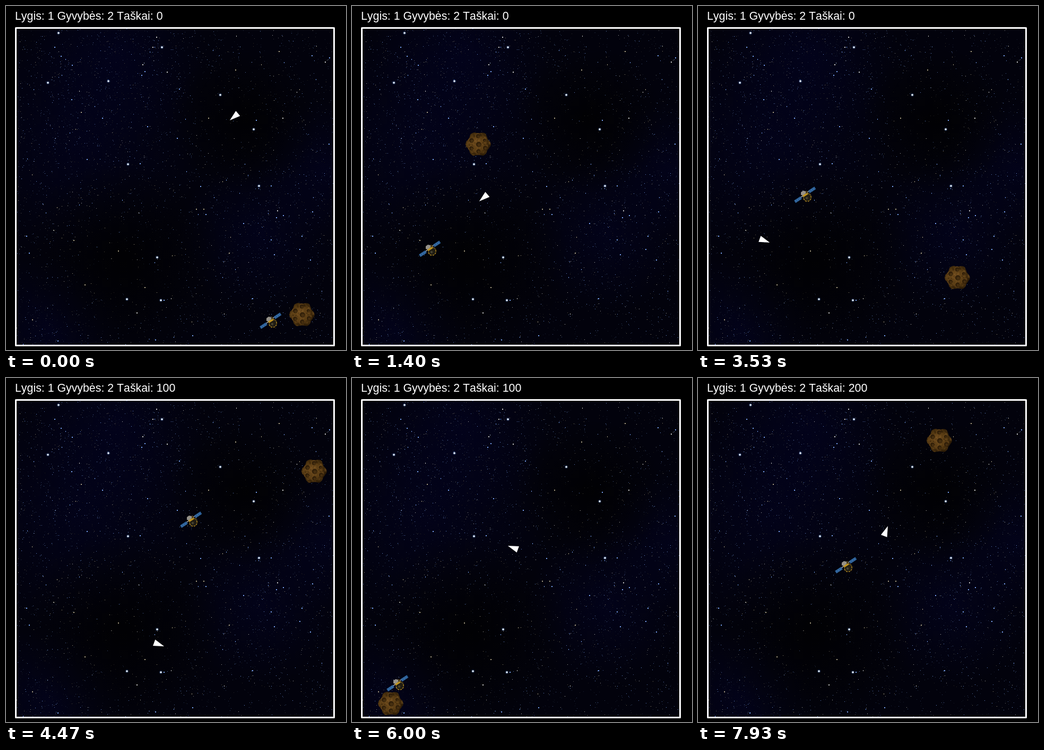
Animation of 641 by 650 pixels, one loop 8 s. Source, as an HTML page with a canvas:

```html
<!DOCTYPE html>
<html lang="lt">
<head>
<meta charset="utf-8">
<title>Asteroidai</title>
<style>
html, body { margin: 0; width: 100%; height: 100%; overflow: hidden; background: #000; }
canvas { display: block; }
</style>
</head>
<body>
<canvas id="stage" width="641" height="650"></canvas>
<script>
const W = 641, H = 650, LOOP = 8000, STEP = 200 / 3, TAU = Math.PI * 2;
const ctx = document.getElementById('stage').getContext('2d');

// Turning points [time, x, y]; the bodies fly straight between them
const asteroidTurns = [
  [0, 558, 582.5], [140, 602, 625], [1400, 237.5, 260.5], [2175, 28, 52],
  [3533, 488.5, 512.5], [3800, 607, 625], [4467, 580.5, 176], [4770, 555, 54],
  [5905, 28, 580], [6000, 72.5, 615], [7230, 608, 100], [7230, 603, 478],
  [7933, 454.5, 117.5]
];
const probeTurns = [
  [0, 499, 595], [110, 604, 631], [900, 42, 54], [1400, 147, 458.5],
  [1650, 220, 631], [2200, 607, 500], [2400, 534, 412], [2800, 320, 55],
  [3310, 41, 480], [3533, 202, 357], [4050, 470, 53], [4467, 349, 268],
  [4920, 32, 430], [5220, 190, 631], [5640, 28, 250], [6000, 86, 577],
  [6740, 606, 350], [7130, 400, 53], [7570, 51, 265], [7933, 279, 354]
];
// The ship curves through [time, x, y, heading in degrees]
const SHIP_SPEED = 0.18;
const shipTurns = [
  [0, 432, 207.6, 140], [1400, 250, 360.6, 140], [2400, 126, 464.6, 140],
  [2870, 62, 495, 215], [3533, 122.8, 442.4, 20], [4467, 285.8, 502.6, 20],
  [5200, 366, 450, -90], [6000, 306.2, 321.5, -160], [6800, 200, 350, 90],
  [7933, 353.2, 292, -69]
];

function segment(turns, t) {
  let i = 0;
  while (i < turns.length - 2 && t >= turns[i + 1][0]) i++;
  const a = turns[i], b = turns[i + 1], span = b[0] - a[0];
  return { a, b, span, k: Math.min(1, (t - a[0]) / span) };
}

function straight(turns, t) {
  const { a, b, k } = segment(turns, t);
  return [1, 2].map(j => a[j] + (b[j] - a[j]) * k);
}

// Hermite curve; its slope gives the heading
function curve(turns, t) {
  const { a, b, span, k } = segment(turns, t);
  const axis = (j, trig) => {
    const p = a[j], d = b[j] - p;
    const u = trig(a[3] * TAU / 360) * SHIP_SPEED * span;
    const v = trig(b[3] * TAU / 360) * SHIP_SPEED * span;
    const q = 3 * d - 2 * u - v, c = u + v - 2 * d;
    return [p + k * (u + k * (q + k * c)), u + k * (2 * q + 3 * k * c)];
  };
  const [x, dx] = axis(1, Math.cos), [y, dy] = axis(2, Math.sin);
  return [x, y, Math.atan2(dy, dx)];
}

function random(seed) {
  return () => {
    seed = (seed * 1664525 + 1013904223) >>> 0;
    return seed / 4294967296;
  };
}

function poly(c, points, fill) {
  c.beginPath();
  points.forEach(([x, y]) => c.lineTo(x, y));
  c.closePath();
  c.fillStyle = fill;
  c.fill();
}

function dot(c, x, y, r, fill) {
  c.beginPath();
  c.arc(x, y, r, 0, TAU);
  c.fillStyle = fill;
  c.fill();
}

function layer(w, h, paint) {
  const el = document.createElement('canvas');
  el.width = w;
  el.height = h;
  paint(el.getContext('2d'));
  return el;
}

function glow(c, x, y, r, rgb, alpha) {
  const g = c.createRadialGradient(x, y, 0, x, y, r);
  g.addColorStop(0, `rgba(${rgb},${alpha})`);
  g.addColorStop(0.5, `rgba(${rgb},${alpha * 0.5})`);
  g.addColorStop(1, `rgba(${rgb},0)`);
  c.fillStyle = g;
  c.fillRect(x - r, y - r, 2 * r, 2 * r);
}

// Regions: x, y, radius
const clouds = [[140, 250, 230], [210, 90, 170], [600, 310, 130], [480, 430, 150], [80, 610, 140]];
const voids = [[450, 215, 140], [220, 480, 190]];
const brightest = [
  [99, 51], [294, 78], [193, 142], [79, 145], [404, 168], [467, 233],
  [230, 299], [477, 340], [285, 475], [228, 554], [292, 556]
];

const sky = layer(W, H, c => {
  const rnd = random(77);
  c.fillStyle = '#000';
  c.fillRect(0, 0, W, H);
  c.save();
  c.beginPath();
  c.rect(19, 42, 600, 600);
  c.clip();
  c.fillStyle = '#02020c';
  c.fillRect(19, 42, 600, 600);
  clouds.forEach(([x, y, r]) => glow(c, x, y, r, '3,3,38', 0.5));
  voids.forEach(([x, y, r]) => glow(c, x, y, r, '1,1,3', 0.95));
  const density = (list, x, y) => list.reduce((sum, [cx, cy, r]) =>
    sum + Math.max(0, 1 - Math.hypot(x - cx, y - cy) / r), 0);
  for (let i = 0; i < 6500; i++) {
    const x = 20 + Math.floor(rnd() * 598), y = 43 + Math.floor(rnd() * 598);
    const blue = density(clouds, x, y), dark = density(voids, x, y);
    const keep = rnd(), level = rnd(), tint = rnd();
    if (keep > 0.65 + blue * 0.4 - dark * 0.5) continue;
    const light = 32 + 175 * level ** 3;
    const rgb = tint < 0.12 + dark * 0.4 ? [0.85, 0.8, 0.66]
      : tint > 0.85 ? [1, 1, 1] : [0.6, 0.8, 1.2];
    c.fillStyle = `rgb(${rgb.map(v => Math.min(255, Math.round(light * v)))})`;
    c.fillRect(x, y, level > 0.99 ? 2 : 1, level > 0.98 ? 2 : 1);
  }
  brightest.forEach(([x, y]) => {
    glow(c, x, y, 4, '90,140,220', 0.6);
    dot(c, x, y, 1.8, '#f0f8ff');
  });
  c.restore();
  c.strokeStyle = '#fff';
  c.lineWidth = 3;
  c.lineJoin = 'round';
  c.strokeRect(18.5, 41.5, 600, 600);
});

const rock = layer(56, 56, c => {
  const rnd = random(5);
  c.translate(28, 28);
  const rim = Array.from({ length: 48 }, (_, i) => {
    const a = i / 48 * TAU, r = 22.3 + 1.7 * Math.cos(6 * a) + rnd() - 0.5;
    return [r * Math.cos(a), r * Math.sin(a)];
  });
  const shade = c.createRadialGradient(-5, -4, 2, -2, 0, 26);
  shade.addColorStop(0, '#6e4b1d');
  shade.addColorStop(0.6, '#523711');
  shade.addColorStop(1, '#2b1c07');
  poly(c, rim, shade);
  c.clip();
  for (let i = 0; i < 170; i++) {
    const a = rnd() * TAU, r = 24 * Math.sqrt(rnd());
    dot(c, r * Math.cos(a), r * Math.sin(a), 0.7 + rnd() * 1.8,
      rnd() < 0.5 ? 'rgba(138,98,44,.22)' : 'rgba(28,17,3,.32)');
  }
  // One central crater and a ring of six
  for (let i = 0; i < 7; i++) {
    const a = i / 6 * TAU + 0.5, d = i ? 13 + rnd() * 3 : 1, r = i ? 3 + rnd() * 1.5 : 5;
    const x = d * Math.cos(a), y = d * Math.sin(a);
    dot(c, x - 0.5, y - 0.5, r + 1, 'rgba(122,86,36,.4)');
    dot(c, x, y, r, 'rgba(40,25,6,.85)');
    dot(c, x + 0.8, y + 1, r * 0.6, 'rgba(84,57,20,.6)');
  }
});

const probe = layer(48, 40, c => {
  c.translate(24, 20);
  const panel = (x, y) => {
    c.save();
    c.translate(x, y);
    c.rotate(-0.57);
    c.fillStyle = '#2c5f97';
    c.fillRect(-7, -2.8, 14, 5.6);
    c.fillStyle = '#4d82b5';
    for (let i = -5; i < 7; i += 4) c.fillRect(i, -2.2, 0.7, 4.4);
    c.restore();
  };
  c.strokeStyle = '#c5c5bd';
  c.lineWidth = 1.4;
  c.beginPath();
  c.moveTo(-10, 6);
  c.lineTo(8, -8);
  c.stroke();
  panel(13, -9.5);
  panel(-13.5, 9);
  dot(c, 4, 4, 8, '#54451d');
  dot(c, 4.5, 5, 6.5, '#211d13');
  c.strokeStyle = '#b58b20';
  c.setLineDash([3, 2]);
  c.beginPath();
  c.arc(4, 5, 7.2, -0.4, 3);
  c.stroke();
  dot(c, 3, 6, 2.2, '#45412f');
  poly(c, [[-6, 0], [6, -4], [5, -1], [-3, 4]], '#c0941f');
  poly(c, [[-8, -5], [-4, -8], [1, -7], [1, -3], [-4, 1], [-8, 0]], '#96928a');
  poly(c, [[1, -8], [5, -7], [4, -4], [1, -4]], '#4b3b18');
});

function drawShip([x, y, angle]) {
  ctx.save();
  ctx.translate(x, y);
  ctx.rotate(angle);
  poly(ctx, [[13.2, 0], [-7, -6.2], [-7, 6.2]], '#fff');
  ctx.restore();
}

function stamp(sprite, [x, y]) {
  ctx.drawImage(sprite, Math.round(x) - sprite.width / 2, Math.round(y) - sprite.height / 2);
}

function render(t) {
  ctx.drawImage(sky, 0, 0);
  const score = 100 * ((t >= 4000) + (t >= 7230));
  ctx.font = '21.33px "Liberation Sans", Arial, sans-serif';
  ctx.fontKerning = 'none';
  ctx.fillStyle = '#fff';
  ctx.fillText(`Lygis: 1 Gyvybės: 2 Taškai: ${score}`, 17, 26);
  stamp(rock, straight(asteroidTurns, t));
  stamp(probe, straight(probeTurns, t));
  drawShip(curve(shipTurns, t));
}

const start = performance.now();
function tick() {
  const t = (performance.now() - start) % LOOP;
  // The game runs at 15 pictures a second
  render(Math.min(119, Math.floor((t + 5) / STEP)) * STEP);
  requestAnimationFrame(tick);
}
tick();
</script>
</body>
</html>
```
